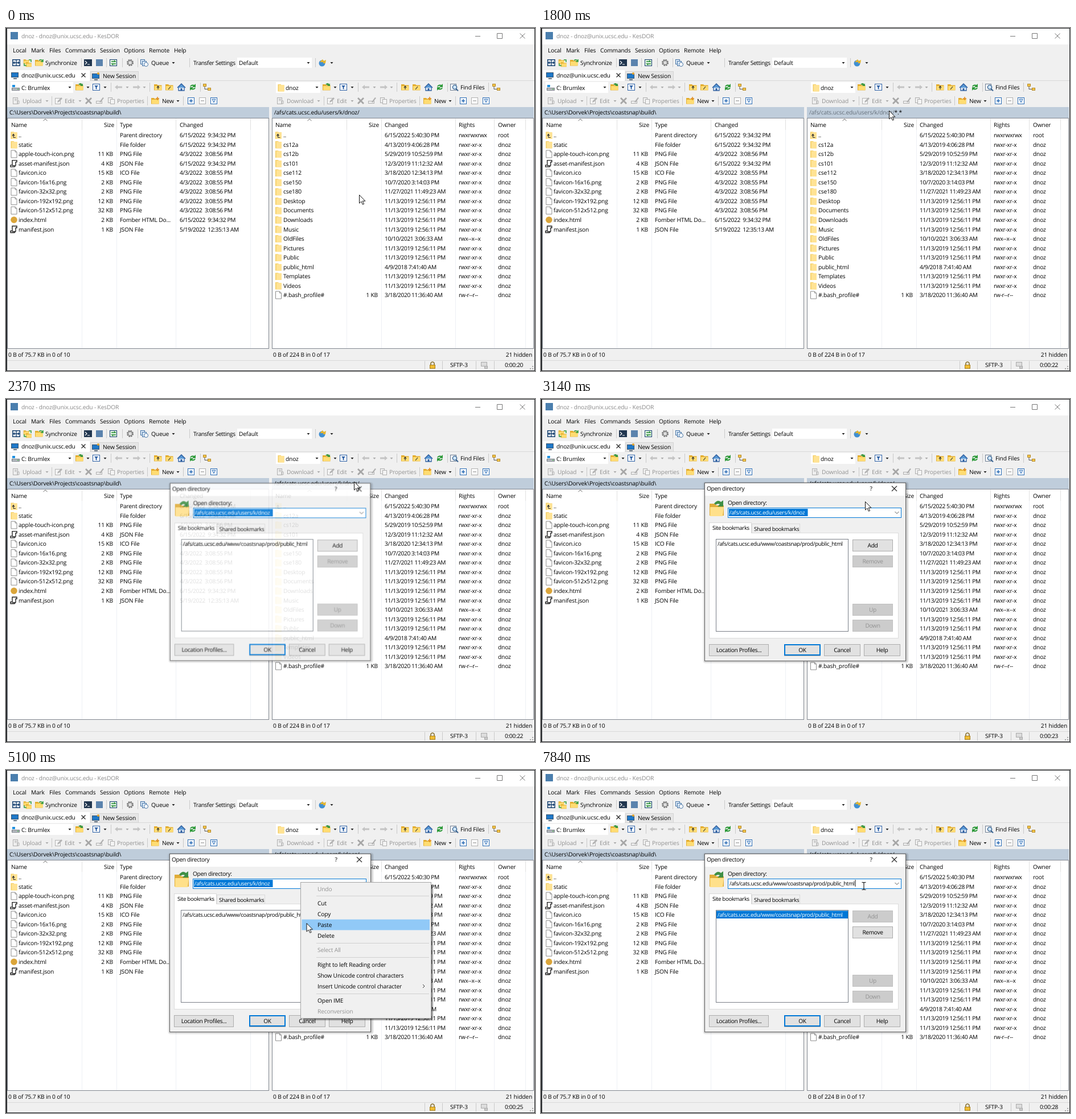
Recreate the animation shown at these times as an HTML page. Size 929 by 603 pixels, loop 7.99 s.

```html
<!DOCTYPE html>
<html lang="en">
<head>
<meta charset="utf-8">
<title>Open directory</title>
<style>
html, body { margin: 0; width: 100%; height: 100%; overflow: hidden; background: #f0f0f0; }
svg { display: block; }
text {
  font: 10.2px "Open Sans", "Noto Sans", sans-serif; letter-spacing: -.15px;
  white-space: pre; text-rendering: geometricPrecision; fill: #000;
}
.dim { fill: #929292; }
.date { letter-spacing: -.38px; }
.mode { letter-spacing: -.3px; }
.tight { letter-spacing: -.35px; }
.url { font-size: 9.7px; letter-spacing: -.36px; }
.inv { fill: #fff; }
.end { text-anchor: end; }
.mid { text-anchor: middle; }
#dialog { transform-origin: 463px 303px; }
</style>
</head>
<body>
<svg id="stage" width="929" height="603" viewBox="0 0 929 603"></svg>
<script>
const LOOP = 7990, USER = 'dnoz', HOST = USER + '@unix.ucsc.edu';
const HOME = '/afs/cats.ucsc.edu/users/k/' + USER;
const SITE = '/afs/cats.ucsc.edu/www/coastsnap/prod/public_html';
const BLUE = '#0078d7';

// Drawing helpers; text is centred vertically on y
const rect = (x, y, w, h, fill, stroke, sw = 1) => stroke
  ? `<rect x="${x + sw / 2}" y="${y + sw / 2}" width="${w - sw}" height="${h - sw}" fill="${fill}" stroke="${stroke}" stroke-width="${sw}"/>`
  : `<rect x="${x}" y="${y}" width="${w}" height="${h}" fill="${fill}"/>`;
const path = (d, fill = 'none', stroke = 'none', sw = 1) =>
  `<path d="${d}" fill="${fill}" stroke="${stroke}" stroke-width="${sw}"/>`;
const text = (x, y, s, cls = '') => `<text x="${x}" y="${y + 3.7}" class="${cls}">${s}</text>`;
const group = (id, body) => `<g id="${id}">${body}</g>`;
const caret = (x, y, c = '#222') => path(`M${x - 2.5} ${y - 1}h5l-2.5 3z`, c);
const bar = (x, y, h = 16) => rect(x, y - h / 2, 1, h, '#c9c9c9');

const folder = path('M-5.5-6h5l1 1h5v11.5h-11z', '#f3cd62') + path('M-4-5h9.5v11.5h-9.5z', '#ffe394');
const wide = path('M-7-5h5l1.5 1.5h7v9h-13.5z', '#e3ad2e') + path('M-6-2h12.5v7h-12.5z', '#ffdc72');
const page = path('M-5-6.5h7l3 3v10h-10z', '#fff', '#8c8c8c') + path('M2-6.5v3h3', 'none', '#8c8c8c');
const box = c => rect(-6, -6, 12, 12, '#fff', c);
const screen = rect(-7, -5, 13, 9, '#1f78c8', '#38546e') + rect(-3, 5, 6, 2, '#607080');
const pencil = c => rect(-6, -5, 10, 11, '#f4f4f4', c) + path('M-2 3l1-3 6-6 2 2-6 6z', c);
const icons = {
  folder, wide, page, screen,
  up: folder + path('M-1 4v-5M-3 1l2-3 2 3M-1 4h4', 'none', '#333', 1.2),
  upw: wide + path('M0 4v-5M-2 1l2-3 2 3', 'none', '#333', 1.2),
  root: wide + path('M2-1l-4 5', 'none', '#333', 1.2),
  json: path('M-3-5.5h8v3h-2v6l-2 2.5h-7v-3h3z', '#fff', '#222', 1.4) + path('M-3 4h5', 'none', '#222', 1.5),
  ball: '<circle r="5.8" fill="#dba53a"/>',
  drive: rect(-7, 0, 14, 5, '#b9bec4', '#6d747c') + rect(-6, -5, 5, 4, '#1c8fe0') + rect(3, 2, 2, 1, '#35c02e'),
  open: wide + path('M-2-5q4-4 7 0l1-2v5h-5l2-1', '#38963c'),
  filter: rect(-7, -6, 13, 12, '#fff', '#2b5fa5') + path('M-4-3h7l-2.5 3v4l-2-1v-3z', '#2b5fa5'),
  back: path('M-7 0l5-4v2.5h8v3h-8v2.5z', '#c4c4c4'),
  fwd: path('M7 0l-5-4v2.5h-8v3h8v2.5z', '#c4c4c4'),
  home: path('M-5 0v6h10v-6', '#e8f1fb', '#2f5f9f', 1.3) + path('M-7 1l7-7 7 7', '#5b9ad6', '#2f5f9f', 1.5) + rect(-1.5, 2, 3, 4, '#2f5f9f'),
  refresh: path('M-5-1q2-5 8-3l2-2v6h-6l2-2q-3-1-4 1zM5 1q-2 5-8 3l-2 2v-6h6l-2 2q3 1 4-1z', '#2e9a3a'),
  tree: rect(-7, -6, 6, 5, '#f5c84a', '#b5892a') + rect(1, 1, 6, 5, '#f5c84a', '#b5892a') + path('M-4-1v4.5h5', 'none', '#555'),
  load: rect(-6, -6, 9, 12, '#eee', '#b0b0b0') + path('M-3-3h4M-3-1h4M2 5v-5h3v5z', 'none', '#b0b0b0'),
  edit: pencil('#b4b4b4'),
  cross: path('M-5-5l10 10M5-5l-10 10', 'none', '#a6a6a6', 2.8),
  rename: rect(-7, 0, 11, 5, '#eee', '#b0b0b0') + path('M-1 2l6-8 2 1-6 8z', '#b0b0b0'),
  props: rect(-6, -6, 8, 10, '#eee', '#b0b0b0') + rect(-2, -3, 8, 9, '#f4f4f4', '#b0b0b0'),
  fresh: wide + path('M4-7v6M1-4h6', 'none', '#e08a1c', 1.5),
  plus: box('#2b6cb5') + path('M-3 0h6M0-3v6', 'none', '#2b6cb5', 1.6),
  minus: box('#b0b0b0') + path('M-3 0h6', 'none', '#b0b0b0', 1.6),
  vee: box('#2b6cb5') + path('M-3-3h6l-3 6z', '#dce9f7', '#2b6cb5'),
  find: rect(-7, -6, 11, 12, '#fff', '#6b7b90') + '<circle cx="1" r="3.6" fill="#cfe6fa" stroke="#35618f" stroke-width="1.4"/>' + path('M3.5 3l3.5 3.5', 'none', '#35618f', 2),
  panels: rect(-7, -6, 14, 12, '#fff', '#17406f', 1.5) + path('M0-6v12M-5 0h10M-3-2l-2 2 2 2M3-2l2 2-2 2', 'none', '#17406f', 1.4),
  sync: `<g transform="translate(-2 -2) scale(.75)">${wide}</g><g transform="translate(2 3) scale(.75)">${wide}</g>` + path('M2-5h4v4M-6 1v4h4', 'none', '#2e9a3a', 1.5),
  syncw: wide + path('M0-4q4-3 6 1M7-6v4h-4', 'none', '#2e9a3a', 1.5),
  term: rect(-7, -6, 14, 12, '#21364f') + path('M-5-3l3 3-3 3M-1 3h4', 'none', '#fff', 1.2),
  plain: rect(-6, -6, 12, 12, '#5b83ad'),
  swap: rect(-7, -6, 13, 12, '#e4f3e4', '#17406f') + path('M-4-2h7l-2-2M4 2h-7l2 2', 'none', '#238a35', 1.5),
  gear: '<circle r="4.5" fill="none" stroke="#777" stroke-width="3" stroke-dasharray="2.4 1.1"/><circle r="3.6" fill="#ddd" stroke="#777"/>',
  queue: rect(-7, -6, 8, 9, '#dbe9f8', '#4674a5') + rect(-4, -3, 8, 9, '#dbe9f8', '#4674a5') + '<circle cx="3" cy="3" r="3.5" fill="#fff" stroke="#4674a5"/>',
  globe: '<circle cx="-1" cy="1" r="5.5" fill="#3f8fd2"/>' + path('M-5-1l5-5 2 3 4-2-1 6h-5l2-2z', '#e6b52d'),
  lock: path('M-3-1v-3q3-4 6 0v3', 'none', '#8a7434', 1.6) + rect(-5, -1, 10, 7, '#f0bd35', '#a9801b'),
  net: rect(-6, -6, 11, 8, '#ddd', '#aaa') + rect(0, 1, 6, 5, '#ccc', '#aaa'),
};
const icon = (name, x, y) => `<g transform="translate(${x} ${y})">${icons[name]}</g>`;
const iconRow = (y, dx, spec) => spec.split(' ').map(s => {
  const [name, x] = s.split(':'), px = +x + dx;
  return name === '|' ? bar(px, y) : name === 'v' ? caret(px, y) : name === 'g' ? caret(px, y, '#aaa') : icon(name, px, y);
}).join('');

function chrome() {
  const menu = { Local: 12, Mark: 44, Files: 76, Commands: 104, Session: 165, Options: 207, Remote: 251, Help: 295 };
  return rect(0, 0, 929, 603, '#26282b') + rect(2, 1, 926, 601, '#f0f0f0') + rect(2, 1, 926, 28, '#fff')
    + rect(8, 7, 13, 13, '#4b7fae') + `<text x="27" y="18" style="fill:#888">${USER} - ${HOST} - KesDOR</text>`
    + path('M824 14.5h9M862.5 9.5h9v9h-9zM902.5 9.5l9 9M911.5 9.5l-9 9', 'none', '#777')
    + Object.entries(menu).map(([s, x]) => text(x, 39, s)).join('')
    + iconRow(61, 0, 'panels:18 sync:38 syncw:58 |:132 term:144 plain:164 |:176 swap:189 |:204 gear:218 |:231 queue:243 v:294 |:322 |:543 globe:556 v:572')
    + text(69, 61, 'Synchronize') + text(255, 61, 'Queue') + text(329, 61, 'Transfer Settings', 'tight')
    + rect(406, 52, 131, 18, '#fff') + text(409, 61, 'Default') + caret(531, 61)
    + rect(2, 92, 926, 1, '#d8d8d8') + rect(3, 74, 144, 19, '#fff') + rect(148, 76, 85, 17, '#e6e6e6', '#d4d4d4')
    + icon('screen', 16, 83) + text(27, 83, HOST) + path('M132.5 79.5l7 7M139.5 79.5l-7 7', 'none', '#222', 1.2)
    + icon('screen', 158, 85) + '<circle cx="162" cy="80" r="2" fill="#e5a52d"/>' + text(170, 84, 'New Session');
}

function toolbars() {
  const nav = 'open:129 v:144 filter:159 v:174 |:184 back:198 g:213 fwd:229 g:243 |:252 upw:267 root:287 home:308 refresh:328 |:341';
  const edit = '|:80 edit:92 g:130 cross:145 rename:165 props:185 |:248 fresh:262 v:302 |:311 plus:325 minus:345 vee:365';
  const labels = dx => text(103 + dx, 128, 'Edit', 'dim') + text(195 + dx, 128, 'Properties', 'dim') + text(274 + dx, 128, 'New');
  return rect(8, 95, 110, 19, '#fff') + rect(474, 95, 78, 19, '#fff')
    + icon('drive', 17, 105) + text(27, 105, 'C: Brumlex') + caret(112, 104)
    + icon('folder', 483, 105) + text(491, 105, USER) + caret(546, 104)
    + iconRow(104, 0, nav + ' tree:353') + iconRow(104, 434, nav + ' find:353 |:413 tree:427')
    + text(798, 104, 'Find Files')
    + iconRow(128, 0, 'load:18 g:72 ' + edit) + iconRow(128, 478, 'load:4 g:71 ' + edit)
    + text(29, 128, 'Upload', 'dim') + text(493, 128, 'Download', 'dim') + labels(0) + labels(478);
}

function panel(x, w, seps, heads, sortX) {
  return rect(x, 139, w, 19, '#bfcddb') + rect(x, 158, w, 406, '#fff', '#828790')
    + seps.map(s => rect(s, 159, 1, 404, '#eef0f5') + rect(s, 160, 1, 19, '#e0e0e0')).join('')
    + heads.map(([hx, s, cls]) => text(hx, 170, s, cls)).join('')
    + path(`M${sortX - 3.5} 163l3.5-3 3.5 3`, 'none', '#666');
}

const rowY = i => 188.5 + 16.53 * i;

function leftPanel() {
  const rows = `up|..||Parent directory|6/15/2022  9:34:32 PM
folder|static||File folder|6/15/2022  9:34:32 PM
page|apple-touch-icon.png|11|PNG File|4/3/2022  3:08:56 PM
json|asset-manifest.json|4|JSON File|6/15/2022  9:34:32 PM
page|favicon.ico|15|ICO File|4/3/2022  3:08:55 PM
page|favicon-16x16.png|2|PNG File|4/3/2022  3:08:55 PM
page|favicon-32x32.png|2|PNG File|4/3/2022  3:08:56 PM
page|favicon-192x192.png|12|PNG File|4/3/2022  3:08:55 PM
page|favicon-512x512.png|32|PNG File|4/3/2022  3:08:56 PM
ball|index.html|2|Fomber HTML Do...|6/15/2022  9:34:32 PM
json|manifest.json|1|JSON File|5/19/2022  12:35:13 AM`.split('\n');
  return panel(2, 460, [133, 194, 298, 429], [[9, 'Name'], [190, 'Size', 'end'], [200, 'Type'], [305, 'Changed']], 69)
    + text(6, 148.5, 'C:\\Users\\Dorvek\\Projects\\coastsnap\\build\\')
    + rows.map((row, i) => {
      const [ic, name, kb, type, date] = row.split('|'), y = rowY(i);
      return icon(ic, 14, y) + text(22, y, name) + text(188, y, kb && kb + ' KB', 'end')
        + text(200, y, type) + text(305, y, date, 'date');
    }).join('') + text(4, 574, '0 B of 75.7 KB in 0 of 10');
}

function rightPanel() {
  const usual = '11/13/2019 12:56:11 PM';
  const rows = `..|6/15/2022 5:40:30 PM|rwxrwxrwx|root
cs12a|4/13/2019 4:06:28 PM
cs12b|5/29/2019 10:52:59 PM
cs101|12/3/2019 11:12:32 AM
cse112|3/18/2020 12:34:13 PM
cse150|10/7/2020 3:14:03 PM
cse180|11/27/2021 11:49:23 AM
Desktop
Documents
Downloads
Music
OldFiles|10/10/2021 3:06:33 AM|rwx--x--x
Pictures
Public
public_html|4/9/2018 7:41:40 AM
Templates
Videos
#.bash_profile#|3/18/2020 11:36:40 AM|rw-r--r--`.split('\n');
  const last = rows.length - 1;
  return panel(467, 460, [598, 659, 789, 857, 912],
    [[473, 'Name'], [655, 'Size', 'end'], [665, 'Changed'], [795, 'Rights'], [864, 'Owner']], 533)
    + group('path', text(471, 148.5, HOME + '/'))
    + group('hover', `<text x="471" y="152.2" style="fill:#66717c">${HOME}/<tspan fill="#000">*.*</tspan></text>`)
    + rows.map((row, i) => {
      const [name, date = usual, mode = 'rwxr-xr-x', owner = USER] = row.split('|'), y = rowY(i);
      return icon(i === 0 ? 'up' : i === last ? 'page' : 'folder', 478.5, y) + text(487, y, name)
        + text(665, y, date, 'date') + text(795, y, mode, 'mode') + text(864, y, owner);
    }).join('') + text(653, rowY(last), '1 KB', 'end')
    + text(469, 574, '0 B of 224 B in 0 of 17') + text(924, 574, '21 hidden', 'end');
}

// Connection time, one label per second
const ticks = [0, 810, 1800, 2820, 3770, 4790, 5790, 6820, 7760];
const status = () => rect(2, 584, 926, 1, '#d9d9d9') + [735, 766, 825, 857].map(x => bar(x, 593, 15)).join('')
  + icon('lock', 749, 593) + text(780, 592.5, 'SFTP-3') + icon('net', 840, 593)
  + ticks.map((_, i) => group('clock' + i, text(876, 592.5, '0:00:2' + i, 'tight'))).join('')
  + path('M925 594v2M925 598v2M921 598v2', 'none', '#aaa', 2);

const softShadow = (x, y, w, h) => [1, 2, 3, 4, 5].map(e =>
  `<rect x="${x - e + 2}" y="${y - e + 3}" width="${w + 2 * e - 2}" height="${h + 2 * e - 3}" rx="${e}" fill="#000" opacity=".05"/>`).join('');

// Lies only along the right and bottom edges
const edgeShadow = (x, y, w, h) => [0, 1, 2, 3].map(e =>
  `<path d="M${x + w + e + .5} ${y + 5}v${h + e - 4.5}H${x + 5}" fill="none" stroke="#000" opacity="${.52 - .14 * e}"/>`).join('');

function button(x, y, w, label, off) {
  const face = off ? rect(x, y, w, 21, '#ccc', '#bfbfbf') : rect(x, y, w, 21, '#e1e1e1', '#adadad');
  return face + text(x + w / 2, y + 10.5, label, 'mid tight' + (off ? ' dim' : ''));
}

function dialog() {
  return softShadow(287, 147, 354, 313) + rect(287, 147, 354, 314, '#f0f0f0', '#606060') + rect(288, 148, 352, 22, '#fff')
    + text(291, 157.5, 'Open directory', 'tight') + text(577.5, 157.5, '?') + path('M616 153l9 9M625 153l-9 9', 'none', '#222', 1.1)
    + path('M296 184h9l3 3h13v18h-25z', '#e0ac38') + path('M297 190h24l-2 16h-22z', '#ffe08a') + path('M304 184q6-8 12-3l4-3v11h-10l4-4q-4-2-7 1z', '#3f8f45')
    + text(328, 182, 'Open directory:', 'tight') + rect(328, 191, 305, 18, '#fff', BLUE)
    + path('M621.5 198l3.5 3.5 3.5-3.5', 'none', '#555')
    + group('oldDir', rect(330, 193, 138.5, 13, BLUE) + text(331, 199, HOME, 'url inv'))
    + group('newDir', text(331, 199, SITE, 'url'))
    + group('caretA', rect(468, 193, 1, 12, '#111')) + group('caretB', rect(551.5, 193, 1, 12, '#111'))
    + rect(295, 235, 333, 186, '#fff', '#dcdcdc') + rect(370, 219, 85, 17, '#f0f0f0', '#d9d9d9')
    + rect(295, 217, 75, 19, '#fff', '#d9d9d9') + rect(296, 234, 73, 3, '#fff')
    + text(301, 226.5, 'Site bookmarks', 'url') + text(374, 228, 'Shared bookmarks', 'url')
    + rect(307, 246, 233, 163, '#fff', '#7a7f87') + text(310, 254, SITE, 'url')
    + button(547, 247, 71, 'Add') + button(547, 275, 71, 'Remove', true)
    + group('picked', rect(308, 247.5, 231, 13.5, BLUE) + text(310, 254, SITE, 'url inv')
      + button(547, 247, 71, 'Add', true) + button(547, 275, 71, 'Remove'))
    + button(547, 360, 71, 'Up', true) + button(547, 388, 71, 'Down', true)
    + button(295, 431, 105, 'Location Profiles...') + button(427, 431, 64, 'OK') + rect(427, 431, 64, 20, 'none', BLUE, 2)
    + button(497, 431, 64, 'Cancel') + button(567, 431, 64, 'Help');
}

const hot = (id, y) => group(id, rect(519.5, y - 9.3, 224.5, 18.8, '#91c9f7'));
const pasteLabel = text(547, 272, 'Paste');

function contextMenu() {
  const items = [['Undo', 209, 'dim'], ['Cut', 234], ['Copy', 253], ['Delete', 291.5], ['Select All', 316.5, 'dim'],
    ['Right to left Reading order', 342], ['Show Unicode control characters', 361],
    ['Insert Unicode control character', 380.5], ['Open IME', 405.5], ['Reconversion', 424.5, 'dim']];
  return rect(517, 197, 230, 240, '#f0f0f0', '#a5a5a5')
    + [221, 304, 329, 393].map(y => rect(545, y, 198, 1, '#d0d0d0')).join('')
    + hot('hotCut', 234) + hot('hotCopy', 253) + hot('hotPaste', 272)
    + items.map(([s, y, cls]) => text(547, y, s, cls)).join('') + pasteLabel
    + path('M732 377l3 3-3 3', 'none', '#333');
}

const pointer = group('arrow', path('M.5.5v14.6l3.4-3.1 2.5 5.3 2.2-1-2.4-5.1h4.7z', '#fff', '#111'))
  + group('beam', path('M-3.5-6.5h2.5l1 1 1-1h2.5M0-6v12M-3.5 6.5h2.5l1-1 1 1h2.5', 'none', '#111', 1.1));

document.getElementById('stage').innerHTML = chrome() + toolbars() + leftPanel() + rightPanel() + status()
  + group('dialog', dialog()) + group('menuShadow', edgeShadow(517, 197, 230, 240)) + group('menu', contextMenu())
  + group('flash', rect(519.5, 262.7, 224.5, 18.8, '#91c9f7') + pasteLabel) + group('cursor', pointer);

// Timelines: hard-stepped keyframes from [ms, declarations]
let css = '';
function track(id, stops) {
  const frames = stops.map(([t, decl]) => `${(t / LOOP * 100).toFixed(4)}%{${decl}}`).join('');
  css += `@keyframes ${id}{${frames}}#${id}{animation:${id} ${LOOP}ms step-end infinite}\n`;
}
const fade = (id, ...stops) => track(id, [[0, 'opacity:0'], ...stops.map(([t, o]) => [t, `opacity:${o}`])]);
const show = (id, ...spans) => fade(id, ...spans.flatMap(([a, b]) => b < LOOP ? [[a, 1], [b, 0]] : [[a, 1]]));

ticks.forEach((t, i) => show('clock' + i, [t, ticks[i + 1] ?? LOOP]));
show('path', [0, 470], [1970, LOOP]);
show('hover', [470, 1970]);
track('dialog', [[0, 0, .96], [2210, .25, .97], [2290, .6, .986], [2370, .88, .996], [2440, 1, 1]]
  .map(([t, o, s]) => [t, `opacity:${o};transform:scale(${s})`]));
show('oldDir', [0, 5640]);
show('newDir', [5640, LOOP]);
show('picked', [5640, LOOP]);
show('caretA', [2440, 2970], [3470, 4000]);
show('caretB', [5640, 6190], [6740, LOOP]);
fade('menu', [4230, .08], [4330, .3], [4400, .7], [4480, 1], [5640, 0]);
show('menuShadow', [4230, 5640]);
show('hotCut', [4790, 4870]);
show('hotCopy', [4870, 4950]);
show('hotPaste', [4950, 5640]);
fade('flash', [5640, .8], [5710, .62], [5790, .45], [5870, .28], [5950, .12], [6040, 0]);
show('arrow', [0, 3220], [4230, 6820]);
show('beam', [3220, 4230], [6820, LOOP]);

// Pointer moves: start, step length, then x,y pairs
const moves = [
  [0, 0, '620,293'],
  [100, 76.6, '620,286 619,262 617,228 615,193 613,167 612,152 611,146'],
  [730, 80, '598,146 584,145'],
  [960, 75, '594,145 613,145 611,145'],
  [2740, 81, '611,147 606,152 596,161 583,171 569,180 555,187 541,192 530,195 521,197 517,198'],
  [4230, 0, '517,197'],
  [4710, 80, '518,203 522,225 526,252 527,267'],
  [5100, 0, '527.5,269'],
  [6420, 80, '529,262 533,250 540,238 548,225 555,213 560,204 562,200'],
  [7210, 85, '567,203 572,206 575,207'],
  [7760, 80, '570,205 567,204'],
];
track('cursor', moves.flatMap(([t, dt, pts]) => pts.split(' ').map((p, i) => {
  const [x, y] = p.split(',');
  return [t + i * dt, `transform:translate(${x}px,${y}px)`];
})));
document.head.appendChild(document.createElement('style')).textContent = css;
</script>
</body>
</html>
```
